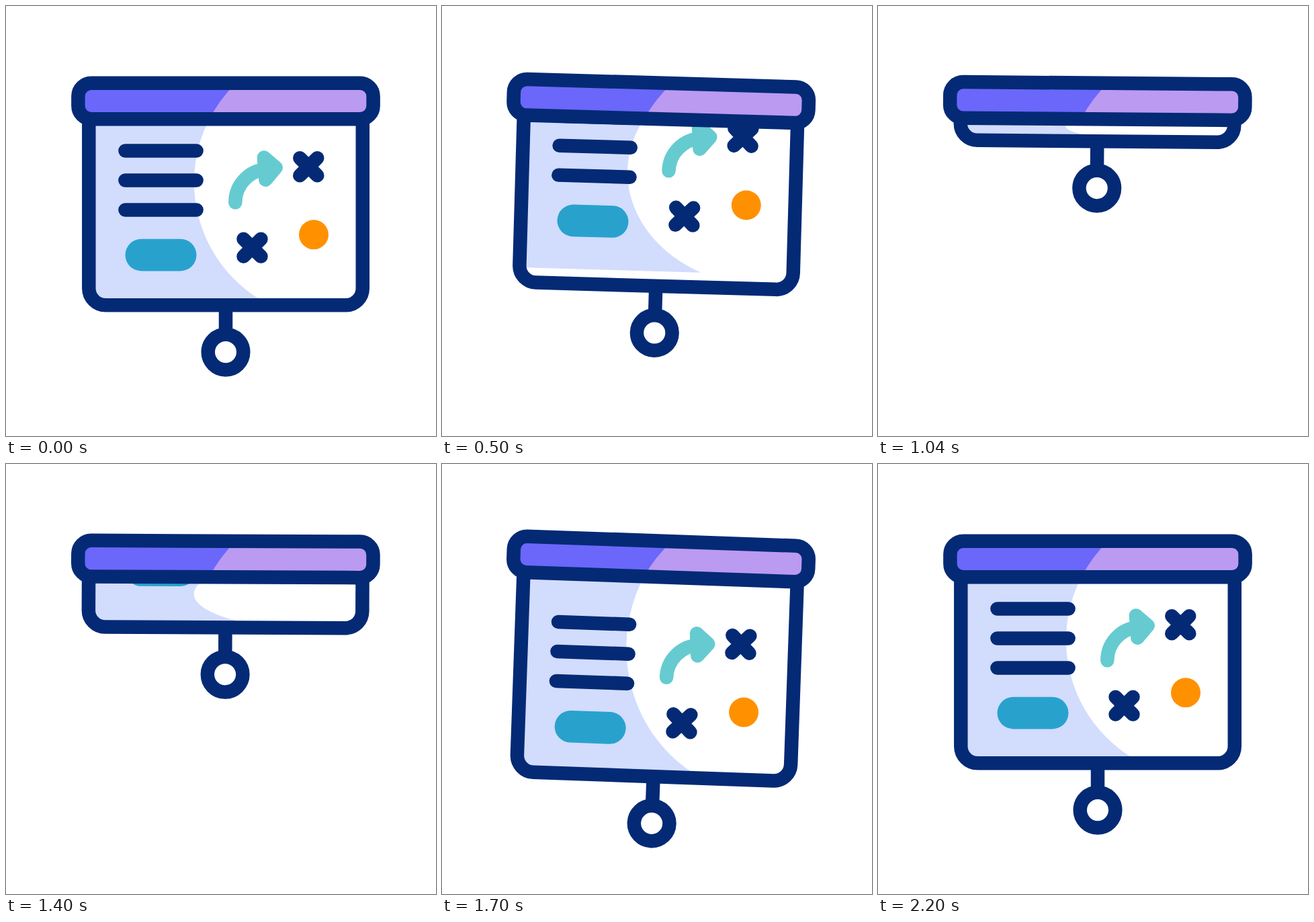
Animation, 640 px wide and 640 px high, one loop 2.42 s. Source, as an HTML page:

```html
<!DOCTYPE html>
<html lang="en">
<head>
<meta charset="utf-8">
<title>Projector screen</title>
<style>
html, body { margin: 0; width: 100%; height: 100%; overflow: hidden; background: #fff; }
svg { display: block; width: 100%; height: 100%; }
.line { fill: none; stroke: #042a75; stroke-width: 20.5; stroke-linecap: round; stroke-linejoin: round; }
</style>
</head>
<body>
<svg viewBox="0 0 640 640">
  <defs>
    <clipPath id="inside"><path id="insidePath"/></clipPath>
    <path id="cross" d="M-13 -13L13 13M13 -13L-13 13"/>
  </defs>
  <g id="board">
    <g clip-path="url(#inside)">
      <g id="shade">
        <path fill="#d2dcfd" d="M123.3 168.2H302.7A205 205 0 0 0 393.2 445.3H123.3Z"/>
      </g>
      <g id="content">
        <path class="line" d="M177.4 215.5H283.6M177.4 259.5H283.6M177.4 303.5H283.6"/>
        <rect x="177.5" y="346.8" width="106" height="47.6" rx="23.8" fill="#28a2cd"/>
        <g stroke="#66cbd0" stroke-width="20.5" stroke-linecap="round" stroke-linejoin="round">
          <path fill="none" d="M341.3 292.5A49.5 49.5 0 0 1 388 243"/>
          <path fill="#66cbd0" d="M383.9 225.4L401.7 240.5L386.4 258.7Z"/>
        </g>
        <use class="line" href="#cross" x="450.3" y="239.3"/>
        <use class="line" href="#cross" x="366.5" y="359.7"/>
        <circle cx="458" cy="340.3" r="22" fill="#ff9100"/>
      </g>
    </g>
    <path id="frame" class="line"/>
    <g id="pull" class="line">
      <path stroke-linecap="butt" d="M327 446V490"/>
      <circle cx="327" cy="515.1" r="26.3" fill="#fff"/>
    </g>
    <rect x="107.4" y="114.7" width="439.2" height="53.6" rx="19.5" fill="#bb9af1"/>
    <path fill="#6a67fa" d="M107.4 114.7H342.4A205 205 0 0 0 302.7 168.3H107.4Z"/>
    <rect class="line" x="107.4" y="114.7" width="439.2" height="53.6" rx="19.5"/>
  </g>
</svg>
<script>
const LOOP = 2420, TOP = 168.2, BOTTOM = 445.3, PIVOT = '327 113';
const el = id => document.getElementById(id);

// Cubic easing (a, 0, b, 1), solved by bisection
function ease(x, a, b) {
  let lo = 0, hi = 1, u = 0.5;
  for (let i = 0; i < 24; i++) {
    u = (lo + hi) / 2;
    const v = 1 - u;
    if (3 * v * v * u * a + 3 * v * u * u * b + u * u * u < x) lo = u; else hi = u;
  }
  return u * u * (3 - 2 * u);
}

// Keys are [time, value]
function track(keys, t, a = 0.5, b = 0.6) {
  for (let i = 1; i < keys.length; i++) {
    const [t0, v0] = keys[i - 1], [t1, v1] = keys[i];
    if (t < t1) return v0 + (v1 - v0) * ease((t - t0) / (t1 - t0), a, b);
  }
  return keys[keys.length - 1][1];
}

// Pull down, roll up, drop, settle
const roll = (lead, down, up) =>
  [[0, 0], [380 - lead, down], [740 - lead, up], [1258, up], [1714, down], [2110, 0]];

const screenKeys = roll(0, 20.5, -244);
const contentKeys = roll(20, 25.3, -257);
const shadeKeys = roll(20, 17, -244);
const swingKeys = [[0, 0], [367, 0], [708, 4.9], [860, -3.8], [980, 1.5], [1120, -1.1],
  [1310, 0], [1710, 2.02], [1900, -1.2], [2080, 0.6], [2200, 0]];

function draw(t) {
  const drop = track(screenKeys, t);
  const stretch = 1 + track(shadeKeys, t) / (BOTTOM - TOP);
  const y = BOTTOM + drop;
  const r = Math.min(25, y - TOP);
  const d = `M123.3 ${TOP}V${y - r}A25 ${r} 0 0 0 148.3 ${y}H505.8A25 ${r} 0 0 0 530.8 ${y - r}V${TOP}`;
  el('frame').setAttribute('d', d);
  el('insidePath').setAttribute('d', d + 'Z');
  el('pull').setAttribute('transform', `translate(0 ${drop})`);
  el('content').setAttribute('transform', `translate(0 ${track(contentKeys, t)})`);
  el('shade').setAttribute('transform', `translate(0 ${TOP}) scale(1 ${stretch}) translate(0 ${-TOP})`);
  el('board').setAttribute('transform', `rotate(${track(swingKeys, t, 0.36, 0.64)} ${PIVOT})`);
}

const start = performance.now();
function tick() {
  draw((performance.now() - start) % LOOP);
  requestAnimationFrame(tick);
}
draw(0);
requestAnimationFrame(tick);
</script>
</body>
</html>
```
